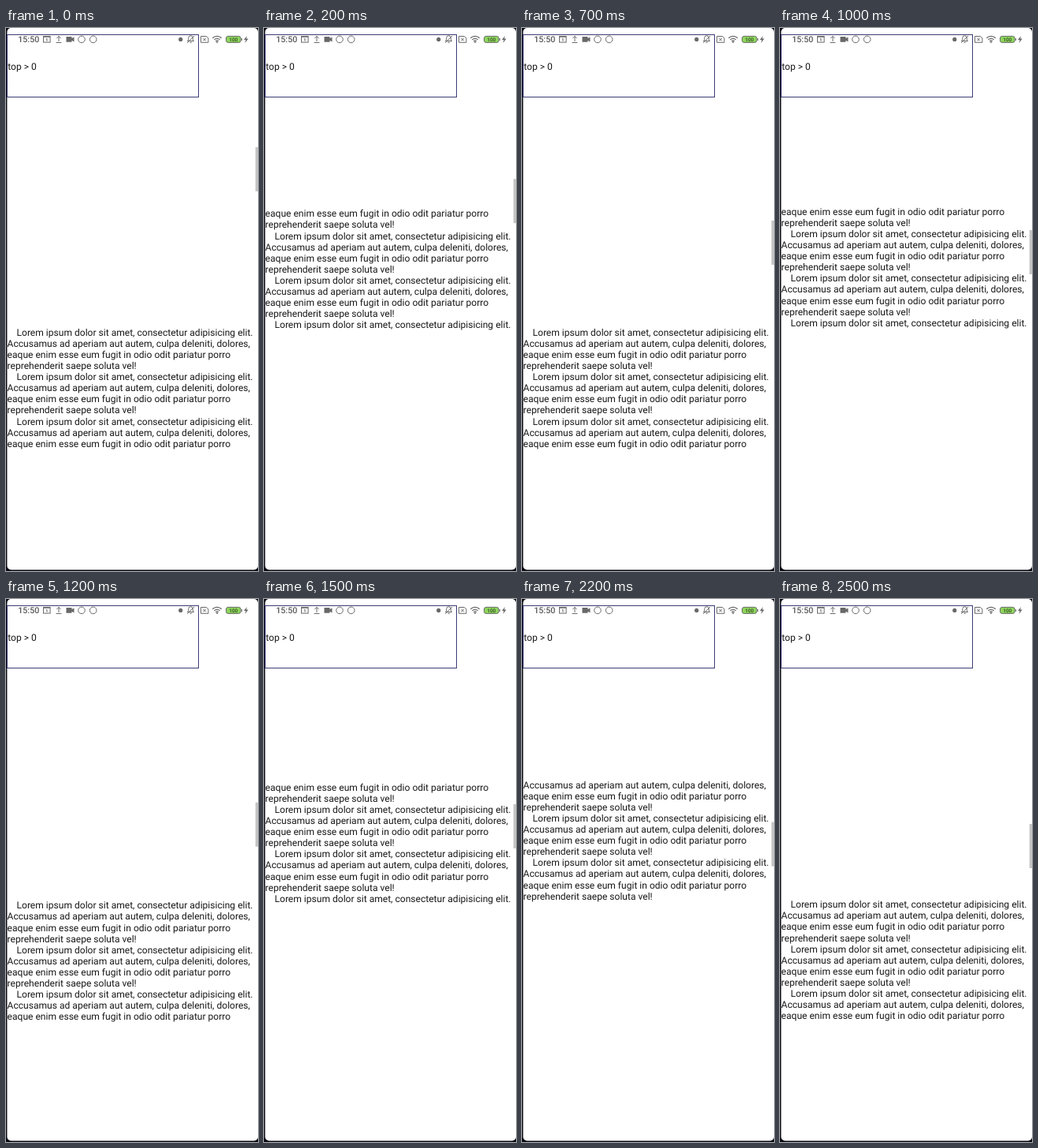
An HTML page that plays this animation: 320x688 px, repeating every 2700 ms.

```html
<!DOCTYPE html>
<html lang="en">
<head>
<meta charset="utf-8">
<title>Scrolling text</title>
<style>
  html, body { margin: 0; width: 100%; height: 100%; overflow: hidden; background: #fff; }
  svg { display: block; width: 100vw; height: 100vh; }
  text { font-family: Roboto, Arial, sans-serif; font-size: 12.07px; fill: #181818; text-rendering: geometricPrecision; }
  .icon { fill: none; stroke: #686868; stroke-width: 1; }
  .solid { fill: #686868; }
</style>
</head>
<body>
<svg viewBox="0 0 320 688" xmlns="http://www.w3.org/2000/svg">
  <rect width="320" height="688" fill="#080812"/>
  <rect x="1.4" width="318.6" height="686.4" rx="5" fill="#fff"/>
  <rect x="1.5" y="8.5" width="243" height="79" fill="none" stroke="#3c3c78"/>
  <text x="2.2" y="52.6">top &gt; 0</text>

  <!-- status bar, left -->
  <text x="15.2" y="18.1" style="font-size:10.7px;font-weight:500;fill:#585858">15:50</text>
  <g class="icon">
    <rect x="47.5" y="10.5" width="8.6" height="7.6"/>
    <path d="M47.5 11.3h8.6M51 14l1-.6v3.3"/>
    <path d="M67 17V10.5M64.3 13l2.7-2.6 2.7 2.6M63.6 18.5h6.8"/>
    <circle cx="96" cy="14.4" r="4.3"/>
    <circle cx="110.7" cy="14.4" r="4.3"/>
  </g>
  <path class="solid" d="M76.5 11h7v2l3-1.6v6l-3-1.6v2h-7z"/>

  <!-- status bar, right -->
  <circle class="solid" cx="221.7" cy="14.4" r="2.6"/>
  <g class="icon">
    <path d="M230.5 16.5h8l-1.2-1.6v-2.3a2.8 2.8 0 0 0-5.6 0v2.3zM233.4 18.3h2.4M230 18.8l9-8.8"/>
    <path d="M247.5 10.5h6.8l2.6 2.4v5.4h-9.4zM250.4 12.9l3.4 3.4M253.8 12.9l-3.4 3.4"/>
    <path stroke-width="1.3" d="M262.3 12.8a8 8 0 0 1 11.4 0M264.3 14.9a5.2 5.2 0 0 1 7.4 0M266.2 16.7a2.6 2.6 0 0 1 3.6 0"/>
  </g>
  <circle class="solid" cx="268" cy="18" r="1"/>
  <rect x="279.5" y="10.4" width="18.6" height="8" rx="2.6" fill="#8ed65c" stroke="#686868"/>
  <path d="M299.4 13v3" stroke="#686868"/>
  <text x="288.8" y="16.8" text-anchor="middle" style="font-size:6.4px;font-weight:500;fill:#304326">100</text>
  <path class="solid" d="M306 10l-4 5h2.5l-1 4 4.2-5.4h-2.6z"/>

  <g id="lines"></g>
  <rect id="thumb" x="316.7" width="3.3" height="56" fill="#c5c5c5"/>
</svg>
<script>
const LOOP = 2700, STEP = 100, LINE = 14.1, ROWS = 11;
const PHRASES = [
  "Lorem ipsum dolor sit amet, consectetur adipisicing elit.",
  "Accusamus ad aperiam aut autem, culpa deleniti, dolores,",
  "eaque enim esse eum fugit in odio odit pariatur porro",
  "reprehenderit saepe soluta vel!"
];

// time, thumb y, content scroll
const KEYS = [
  [0, 151, -5.5], [400, 220, 821.4], [700, 244, 1122.5], [1000, 256, 1267],
  [1500, 260, 1317.4], [2000, 278, 1515], [2400, 285, 1628.6], [2700, 285, 1628.6]
];
// spans in which the text window sits low
const LOW = [[0, 200], [600, 800], [1200, 1400], [2300, 2700]];
const HIGH_TOP = 230.5, LOW_TOP = 380;

const thumb = document.getElementById("thumb");
const rows = Array.from({ length: ROWS }, () => {
  const row = document.createElementNS("http://www.w3.org/2000/svg", "text");
  return document.getElementById("lines").appendChild(row);
});

const gradient = (i, c) => (KEYS[i + 1][c] - KEYS[i][c]) / (KEYS[i + 1][0] - KEYS[i][0]);

function slope(i, c) {
  if (i === 0) return gradient(0, c) * 1.3;
  if (i === KEYS.length - 1) return 0;
  const a = gradient(i - 1, c), b = gradient(i, c);
  return a * b > 0 ? 2 * a * b / (a + b) : 0;
}

// monotone cubic through the keys
function sample(t, c) {
  let i = 0;
  while (i < KEYS.length - 2 && t >= KEYS[i + 1][0]) i++;
  const span = KEYS[i + 1][0] - KEYS[i][0];
  const p = (t - KEYS[i][0]) / span, q = 1 - p;
  return KEYS[i][c] * (1 + 2 * p) * q * q + KEYS[i + 1][c] * p * p * (3 - 2 * p)
    + span * p * q * (slope(i, c) * q - slope(i + 1, c) * p);
}

function draw(time) {
  const t = Math.floor((time % LOOP) / STEP) * STEP;
  const scroll = sample(t, 2);
  const first = Math.ceil(scroll / LINE);
  const top = LOW.some(([a, b]) => t >= a && t < b) ? LOW_TOP : HIGH_TOP;
  const y = top + first * LINE - scroll + 4.2;
  rows.forEach((row, i) => {
    const phrase = (first + i) % PHRASES.length;
    row.textContent = PHRASES[phrase];
    row.setAttribute("x", phrase ? 1.6 : 13.5);
    row.setAttribute("y", y + i * LINE);
  });
  thumb.setAttribute("y", sample(t, 1));
}

const start = performance.now();
function tick() {
  draw(performance.now() - start);
  requestAnimationFrame(tick);
}
tick();
</script>
</body>
</html>
```
